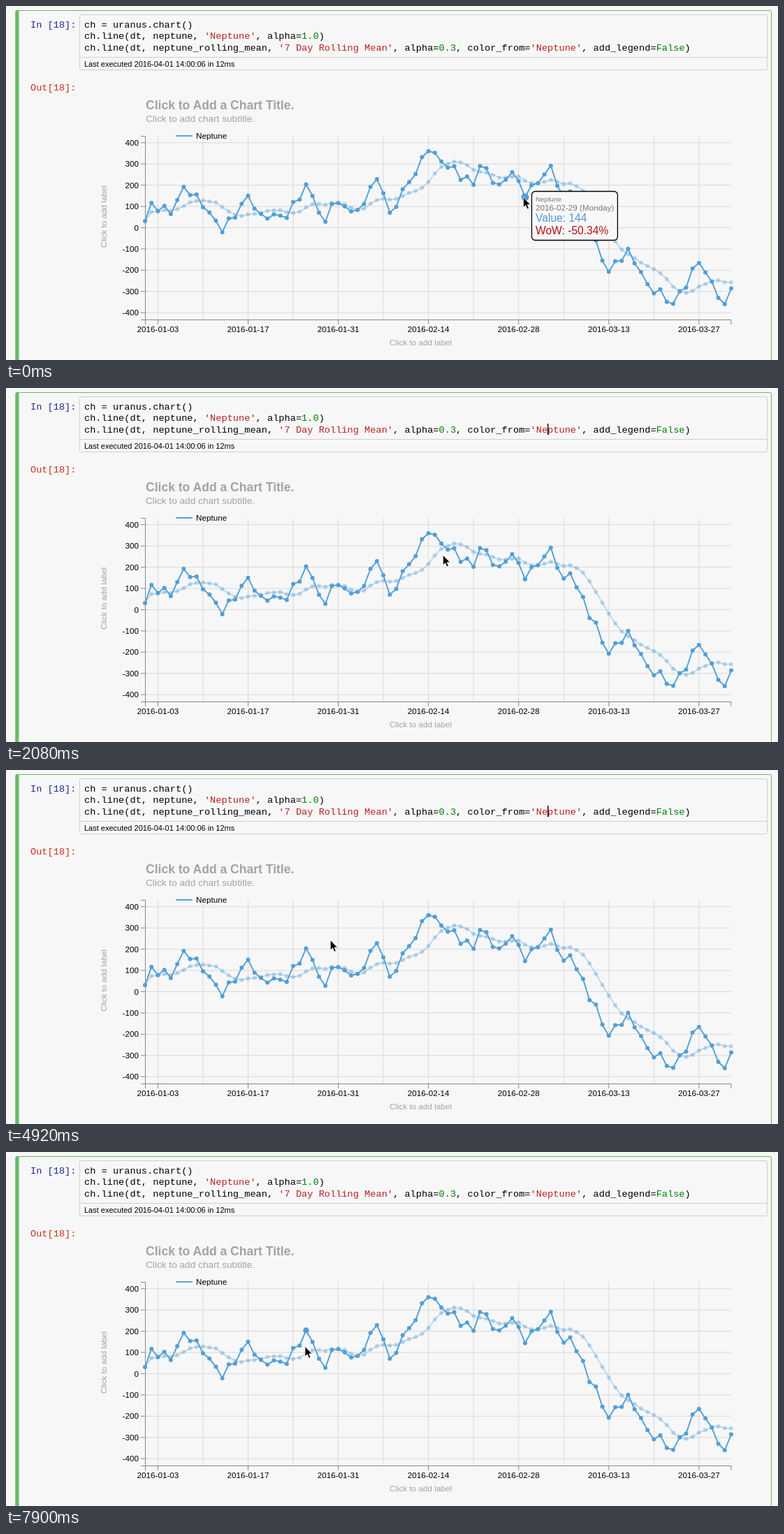
An HTML page that plays this animation: 1105x507 px, repeating every 8000 ms.

```html
<!DOCTYPE html>
<html lang="en">
<head>
<meta charset="utf-8">
<title>Notebook chart</title>
<style>
  html, body { margin: 0; width: 100%; height: 100%; overflow: hidden; background: #f7f7f7; }
  svg { display: block; width: 1105px; height: 507px; font: 11.7px "Liberation Sans", Arial, sans-serif; }
  .code { font: 13.65px "Liberation Mono", "Courier New", monospace; white-space: pre; }
  .str { fill: #ba2121; }
  .num { fill: #008000; }
  .hint { fill: #a3a3a3; }
  .grid { stroke: #d9d9d9; fill: none; }
  .axis { stroke: #888; fill: none; }
  .line { stroke: #529fd7; stroke-width: 1.9; fill: none; stroke-linejoin: round; }
  .dot { fill: #529fd7; }
</style>
</head>
<body>
<svg viewBox="0 0 1105 507">
  <rect x="14" y="6.5" width="1081.5" height="520" rx="2" fill="none" stroke="#66bb6a"/>
  <path d="M13.5 8Q13.5 6 15.5 6H18.5V507H13.5Z" fill="#66bb6a"/>
  <rect x="105.5" y="12.5" width="984" height="79" rx="2" fill="none" stroke="#cfcfcf"/>
  <path d="M106 73.5H1089" stroke="#cfcfcf"/>

  <g class="code">
    <text x="35" y="31" fill="#1f2a8c">In [18]:</text>
    <text x="35" y="121" fill="#c8321f">Out[18]:</text>
    <text x="112" y="30.5">ch = uranus.chart()</text>
    <text x="112" y="47">ch.line(dt, neptune, <tspan class="str">'Neptune'</tspan>, alpha=<tspan class="num">1.0</tspan>)</text>
    <text x="112" y="63.5">ch.line(dt, neptune_rolling_mean, <tspan class="str">'7 Day Rolling Mean'</tspan>, alpha=<tspan class="num">0.3</tspan>, color_from=<tspan class="str">'Neptune'</tspan>, add_legend=<tspan class="num">False</tspan>)</text>
  </g>
  <rect id="caret" x="775" y="51" width="1.4" height="16"/>
  <text x="112" y="87" font-size="11">Last executed 2016-04-01 14:00:06 in 12ms</text>

  <g class="hint">
    <text x="200" y="148" font-size="17.55" font-weight="bold">Click to Add a Chart Title.</text>
    <text x="200" y="166" font-size="13.65">Click to add chart subtitle.</text>
    <text x="593.5" y="486" text-anchor="middle">Click to add label</text>
    <text transform="translate(144 301.5) rotate(-90)" text-anchor="middle">Click to add label</text>
  </g>

  <g id="chart"></g>
  <path class="line" d="M243 186H267"/>
  <text x="272" y="190">Neptune</text>
  <circle id="hot" class="dot"/>

  <g id="tip">
    <rect x=".5" y=".5" height="70" rx="5" fill="#f8f8f8" stroke="#000" stroke-width="1.3"/>
    <text x="6" y="15" font-size="9.75" fill="#777">Neptune</text>
    <text x="6" y="27.5" fill="#777"></text>
    <text x="6" y="44" font-size="15.6" fill="#5096d8"></text>
    <text x="6" y="61.5" font-size="15.6"></text>
  </g>
  <path id="cursor" d="M0 0V14.4L3.3 11.4L5.6 16.8L8 15.8L5.8 10.6H10.2Z" stroke="#fff" stroke-width=".8"/>
</svg>
<script>
const LOOP = 8000;
const FRAME = 148;
const DAYS = 92;

// Main turning points by day; the days between follow a straight line with a ripple.
const turns = {
  0: 31, 1: 117, 4: 64, 6: 192, 8: 156, 12: -21, 16: 150, 18: 65, 22: 46, 25: 204, 28: 28, 29: 112,
  33: 84, 36: 228, 37: 162, 38: 71, 44: 360, 51: 202, 52: 290, 55: 204, 57: 261, 59: 144, 63: 292,
  65: 146, 66: 171, 72: -207, 75: -99, 78: -265, 82: -358, 86: -166, 90: -360, 91: -286
};
const turnDays = Object.keys(turns).map(Number);

function valueOn(day) {
  if (day in turns) return turns[day];
  const next = turnDays.find(d => d > day);
  const last = turnDays.findLast(d => d < day);
  const along = (day - last) / (next - last);
  return turns[last] + (turns[next] - turns[last]) * along + 22 * Math.sin(2.53 * day);
}

const values = Array.from({ length: DAYS }, (_, day) => valueOn(day));
const rolling = values.map((_, day) => {
  const week = values.slice(Math.max(0, day - 6), day + 1);
  return week.reduce((a, b) => a + b) / week.length;
});

const xOf = day => 199 + day * 839 / (DAYS - 1);
const yOf = value => 317.5 - value * 0.3043;
const dateOf = day => new Date(Date.UTC(2016, 0, 1 + day));
const isoDate = day => dateOf(day).toISOString().slice(0, 10);
const weekday = day => dateOf(day).toLocaleDateString('en-US', { weekday: 'long', timeZone: 'UTC' });

function add(parent, tag, attrs, text = '') {
  const el = document.createElementNS('http://www.w3.org/2000/svg', tag);
  for (const key in attrs) el.setAttribute(key, attrs[key]);
  el.textContent = text;
  return parent.appendChild(el);
}

const chart = document.getElementById('chart');
const stroke = (name, d) => add(chart, 'path', { class: name, d });

for (let day = 2; day < DAYS; day += 7) stroke('grid', `M${xOf(day)} 186V450`);
for (let v = -400; v <= 400; v += 100) {
  stroke('grid', `M199 ${yOf(v)}H1038`);
  stroke('axis', `M193 ${yOf(v)}H199`);
  add(chart, 'text', { x: 190, y: yOf(v) + 4, 'text-anchor': 'end' }, v);
}
for (let day = 2; day < DAYS; day += 14) {
  stroke('axis', `M${xOf(day)} 450V456`);
  add(chart, 'text', { x: xOf(day), y: 467, 'text-anchor': 'middle' }, isoDate(day));
}
stroke('axis', 'M193 186.5H199.5V449.5M193 449.5H199.5V456M199.5 449.5H1038V456');

function series(data, opacity) {
  const points = data.map((v, day) => [xOf(day), yOf(v)]);
  add(chart, 'polyline', { class: 'line', points: points.join(' '), opacity });
  for (const [cx, cy] of points) add(chart, 'circle', { class: 'dot', cx, cy, r: 3, opacity });
}
series(rolling, 0.34);
series(values, 1);

const smooth = u => u * u * (3 - 2 * u);
const easeIn = u => u ** 1.6;
const easeOut = u => 1 - (1 - u) ** 1.6;
const clamp = u => Math.min(1, Math.max(0, u));

const moves = [
  { start: 1490, steps: 6, from: [740.5, 274], to: [601.5, 207.5], easeX: easeOut, easeY: easeIn },
  { start: 4025, steps: 10, from: [601.5, 207.5], to: [426.5, 253.5], easeX: smooth, easeY: smooth },
  { start: 7745, steps: 2, from: [426.5, 253.5], to: [428, 278.5], easeX: smooth, easeY: smooth }
];
const hovers = [
  { day: 59, arrive: -FRAME * 3, leave: 1490 },
  { day: 44, arrive: 2230, leave: 4025 },
  { day: 25, arrive: 5510, leave: 7745 }
];

const [caret, hot, tip, cursor] = ['caret', 'hot', 'tip', 'cursor'].map(id => document.getElementById(id));
const [tipBox, , tipDate, tipValue, tipChange] = tip.children;
const moveTo = (el, x, y) => el.setAttribute('transform', `translate(${x} ${y})`);
const show = (el, visible) => { el.style.display = visible ? '' : 'none'; };

function cursorAt(t) {
  const { start, steps, from, to, easeX, easeY } = moves.findLast(m => m.start <= t) ?? moves[0];
  const u = clamp((Math.floor((t - start) / FRAME) + 1) / steps);
  return [from[0] + (to[0] - from[0]) * easeX(u), from[1] + (to[1] - from[1]) * easeY(u)];
}

// Three blinks make one uneven cycle.
function caretOn(t) {
  const phase = (t - 600) % 3130;
  return [0, 1190, 2080].some(on => phase >= on && phase < on + 590);
}

function fillTip(day) {
  const change = (values[day] / values[day - 7] - 1) * 100;
  tipDate.textContent = `${isoDate(day)} (${weekday(day)})`;
  tipValue.textContent = `Value: ${values[day]}`;
  tipChange.textContent = `WoW: ${change.toFixed(2)}%`;
  tipChange.setAttribute('fill', change < 0 ? '#b31217' : '#337d0c');
  tipBox.setAttribute('width', tipDate.getComputedTextLength() + 10.5);
}

function draw(t) {
  show(caret, caretOn(t));

  const [x, y] = cursorAt(t);
  moveTo(cursor, x, y);

  const { day, arrive, leave } = hovers.findLast(h => h.arrive <= t);
  const grown = clamp(Math.min((t - arrive) / 300, 1 - (t - leave) / 300));
  moveTo(hot, xOf(day), yOf(values[day]));
  hot.setAttribute('r', 3 + 2.5 * grown);

  show(tip, t < leave);
  if (t < leave) {
    moveTo(tip, x + 11.5, y - 9);
    fillTip(day);
  }
}

const start = performance.now();
function tick() {
  draw((performance.now() - start) % LOOP);
  requestAnimationFrame(tick);
}
tick();
</script>
</body>
</html>
```
